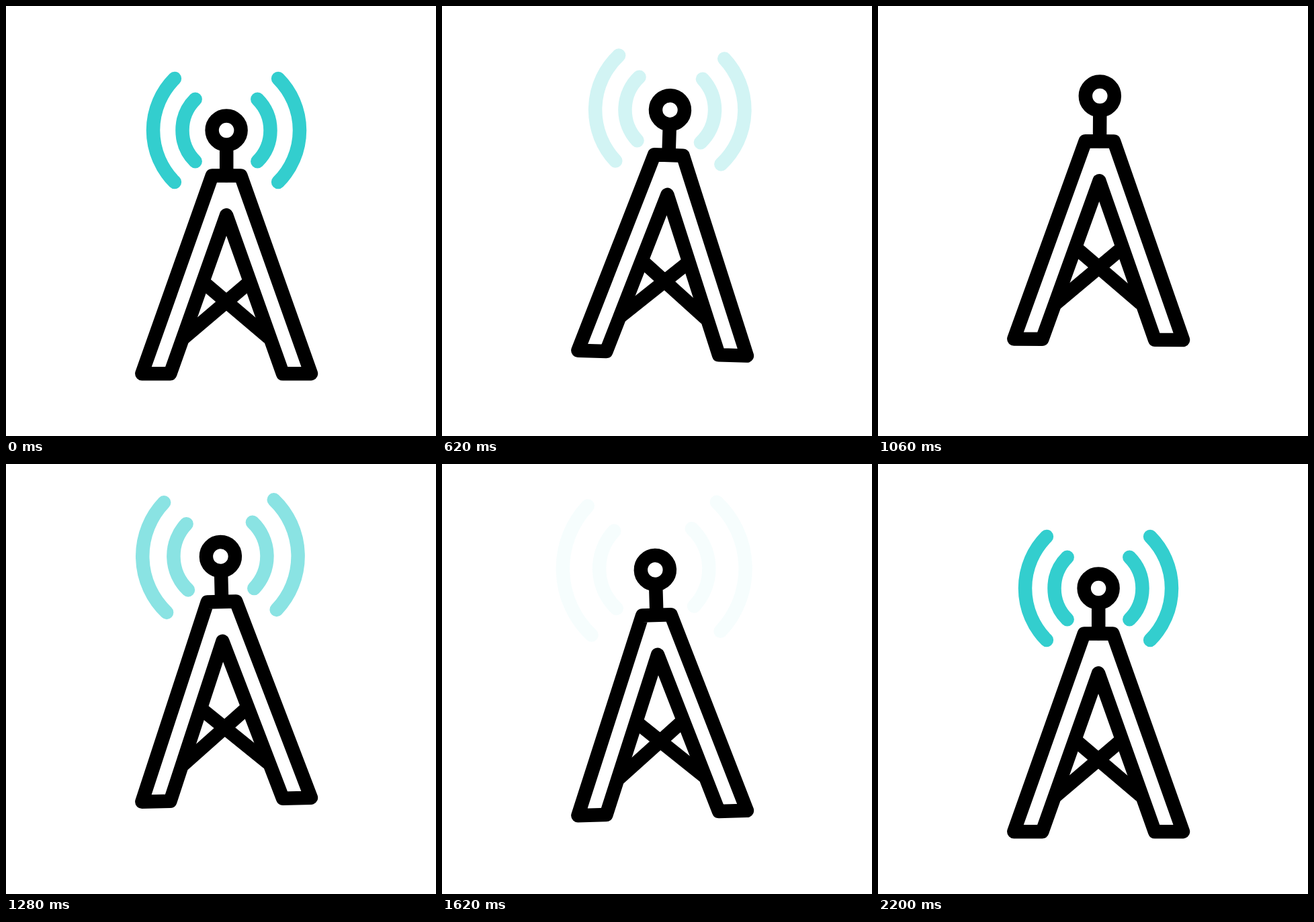
Animation of 640 by 640 pixels, one loop 2.22 s. Source, as an HTML page:

```html
<!DOCTYPE html>
<html lang="en">
<head>
<meta charset="utf-8">
<title>Radio tower</title>
<style>
  html, body { margin: 0; width: 100%; height: 100%; overflow: hidden; background: #fff; }
  svg { display: block; width: 100%; height: 100%; }
</style>
</head>
<body>
<svg viewBox="0 0 640 640" fill="none" stroke-width="20.5" stroke-linecap="round" stroke-linejoin="round">
  <g id="tower">
    <path id="waves" stroke="#33cece"/>
    <g stroke="#000">
      <path d="M306.8 252.4H349.4L454 547.2H412L328 311.3L244.4 547.2H202.3Z"/>
      <path d="M265.5 493.2L362.5 410.9M390.5 493.2L293.5 410.9"/>
      <path d="M328.2 212V252"/>
      <circle cx="328.1" cy="185" r="21.5"/>
    </g>
  </g>
</svg>
<script>
const LOOP = 2220, END = 2200, TOP = END / 2;
const BEAT = 530, LAST = 560, REST = TOP + LAST;
const tower = document.getElementById('tower');
const waves = document.getElementById('waves');

// Smooth 0 to 1 while t runs from a to b.
function ease(t, a, b) {
  const u = Math.min(1, Math.max(0, (t - a) / (b - a)));
  return u * u * (3 - 2 * u);
}

const lift = t => -51.2 * (ease(t, 0, TOP) - ease(t, TOP, END));
const tilt = t => 1.96 * (ease(t, 0, 755) - 2 * ease(t, 755, 1450) + ease(t, 1450, END));

// Two beats on the way up, one on the way down, then a return to full strength.
function pulse(t) {
  if (t >= REST) return { scale: 1, opacity: ease(t, REST, END) };
  const last = t >= TOP;
  const span = last ? LAST : BEAT;
  const start = last ? TOP : Math.min(1, Math.floor(t / BEAT)) * BEAT;
  const p = t - start;
  const rise = ease(p, 0, span / 2), fall = ease(p, span / 2, span);
  const opacity = start ? 0.8 * (rise - fall) : 1 - 0.2 * rise - 0.8 * fall;
  return { scale: 1 + 0.25 * ease(p, 0, span), opacity };
}

// A quarter circle on the left (side -1) or right (side 1).
function arc(cx, cy, r, side) {
  const k = r * Math.SQRT1_2, x = cx + side * k;
  return `M${x} ${cy - k}A${r} ${r} 0 0 ${side > 0 ? 1 : 0} ${x} ${cy + k}`;
}

function draw(t) {
  const { scale, opacity } = pulse(t);
  const cx = 328 - 6 * (scale - 1), cy = 185 - 8 * (scale - 1);
  const ring = r => arc(cx, cy, r * scale, -1) + arc(cx, cy, r * scale, 1);
  waves.setAttribute('d', ring(65.5) + ring(109));
  waves.setAttribute('opacity', opacity);
  tower.setAttribute('transform', `translate(0 ${lift(t)}) rotate(${tilt(t)} 328 547)`);
}

const start = performance.now();
function tick() {
  draw((performance.now() - start) % LOOP);
  requestAnimationFrame(tick);
}
draw(0);
requestAnimationFrame(tick);
</script>
</body>
</html>
```
